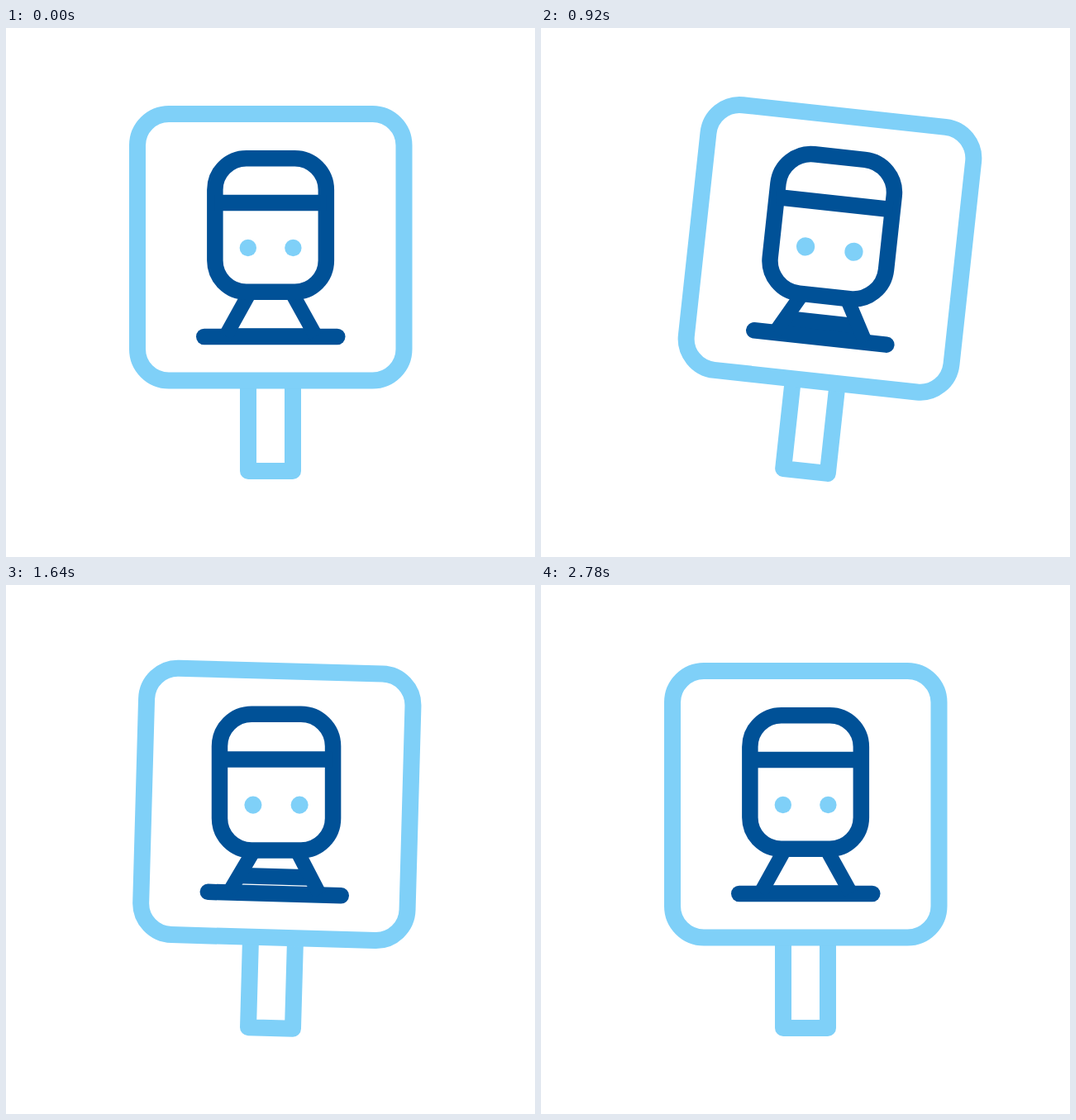
Recreate the animation shown at these times as an HTML page. Size 640 by 640 pixels, loop 3360 ms.

```html
<!DOCTYPE html>
<html lang="en">
<head>
<meta charset="utf-8">
<title>Train stop sign</title>
<style>
  html, body { margin: 0; width: 100%; height: 100%; overflow: hidden; background: #fff; }
  svg { display: block; width: 100%; height: 100%; }
  .line { fill: none; stroke-linejoin: round; }
  .light { stroke: #7fd0f8; stroke-width: 20; }
  .dark { stroke: #005197; stroke-width: 19.5; }
</style>
</head>
<body>
<svg viewBox="0 0 640 640">
  <g id="sign">
    <path class="line light" d="M293 428V536H347V428"/>
    <rect class="line light" x="159" y="104" width="322.5" height="322.5" rx="38"/>
    <path class="line dark" id="sleeper"/>
    <path class="line dark" stroke-linecap="round" d="M239.75 373.5H400.75"/>
    <path class="line dark" style="stroke-width:17.7" d="M296 318L265.5 373M344.5 318L375 373"/>
    <g id="train">
      <rect class="line dark" id="body" style="fill:#fff"/>
      <path class="line dark" id="band"/>
      <circle id="eyeL" cy="266"/>
      <circle id="eyeR" cy="266"/>
    </g>
  </g>
</svg>
<script>
const LOOP = 3360, ACTIVE = 2780, STEP = 20;
const PULSE = ACTIVE / 2, RISE = ACTIVE / 4, BLINK = ACTIVE / 8;
const LIGHT = '#7fd0f8', DARK = '#005197';
const CX = 320.1, CY = 238.5;

// [time in ms, degrees]
const SWING = [[0, 0], [280, 0], [540, 2.1], [640, 3.44], [905, 6.25], [1080, 2.27],
  [1220, -2.57], [1345, -5], [1600, 2.25], [1640, 1.6], [1790, -1.5],
  [1980, -0.8], [2160, 0], [LOOP, 0]];
const WOBBLE = [[0, 0], [640, -0.4], [920, 0], [1400, 0], [1640, -1.6], [1980, 1],
  [2250, -1.2], [2480, 0.6], [2700, 0], [LOOP, 0]];

const $ = id => document.getElementById(id);
const set = (id, attrs) => {
  for (const name in attrs) $(id).setAttribute(name, attrs[name]);
};
const clamp = u => Math.min(1, Math.max(0, u));
const ease = u => u * u * (3 - 2 * u);
const softEase = u => (u + ease(u)) / 2;

const secant = (keys, i) =>
  (keys[i + 1][1] - keys[i][1]) / (keys[i + 1][0] - keys[i][0]);

// Flat at turning points, smooth in between
function slope(keys, i) {
  if (i === 0 || i === keys.length - 1) return 0;
  const a = secant(keys, i - 1), b = secant(keys, i);
  return a * b > 0 ? 2 * a * b / (a + b) : 0;
}

function curve(keys, t) {
  let i = 0;
  while (i < keys.length - 2 && t >= keys[i + 1][0]) i++;
  const [t0, v0] = keys[i], [t1, v1] = keys[i + 1];
  const d = t1 - t0, u = (t - t0) / d, p = ease(u);
  return v0 + (v1 - v0) * p
    + d * slope(keys, i) * u * (1 - u) ** 2
    - d * slope(keys, i + 1) * u * u * (1 - u);
}

function draw(t) {
  const run = t < ACTIVE ? t : 0;
  const phase = run % PULSE / PULSE;
  const pulse = ease(1 - Math.abs(2 * phase - 1));
  const scale = 1 + 0.065 * pulse;
  const w = 67.25 * scale, h = 80.75 * scale;

  set('sign', { transform: `rotate(${curve(SWING, t)} 320 536)` });
  set('train', { transform: `rotate(${curve(WOBBLE, t)} 320 288)` });
  set('body', { x: CX - w, y: CY - h, width: 2 * w, height: 2 * h, rx: 38 * scale });
  const bandY = CY - 27 * scale;
  set('band', { d: `M${CX - w} ${bandY}H${CX + w}` });

  // The sleeper climbs from the rail to the train, as wide as the legs there
  const y = 373 - 54 * softEase(clamp(run % RISE / 625));
  const half = 24.25 + (y - 318) * 30.5 / 55;
  set('sleeper', { d: `M${320.25 - half} ${y}H${320.25 + half}` });

  const dark = Math.floor(run / BLINK) % 2;
  const gap = 27.3 * (1 + 0.1 * pulse);
  const eye = { r: 10.2 + 1.2 * pulse + 0.9 * dark, fill: dark ? DARK : LIGHT };
  set('eyeL', { cx: CX - gap, ...eye });
  set('eyeR', { cx: CX + gap, ...eye });
}

const start = performance.now();
function tick() {
  const t = (performance.now() - start) % LOOP;
  draw(Math.floor(t / STEP) * STEP);
  requestAnimationFrame(tick);
}
tick();
</script>
</body>
</html>
```
